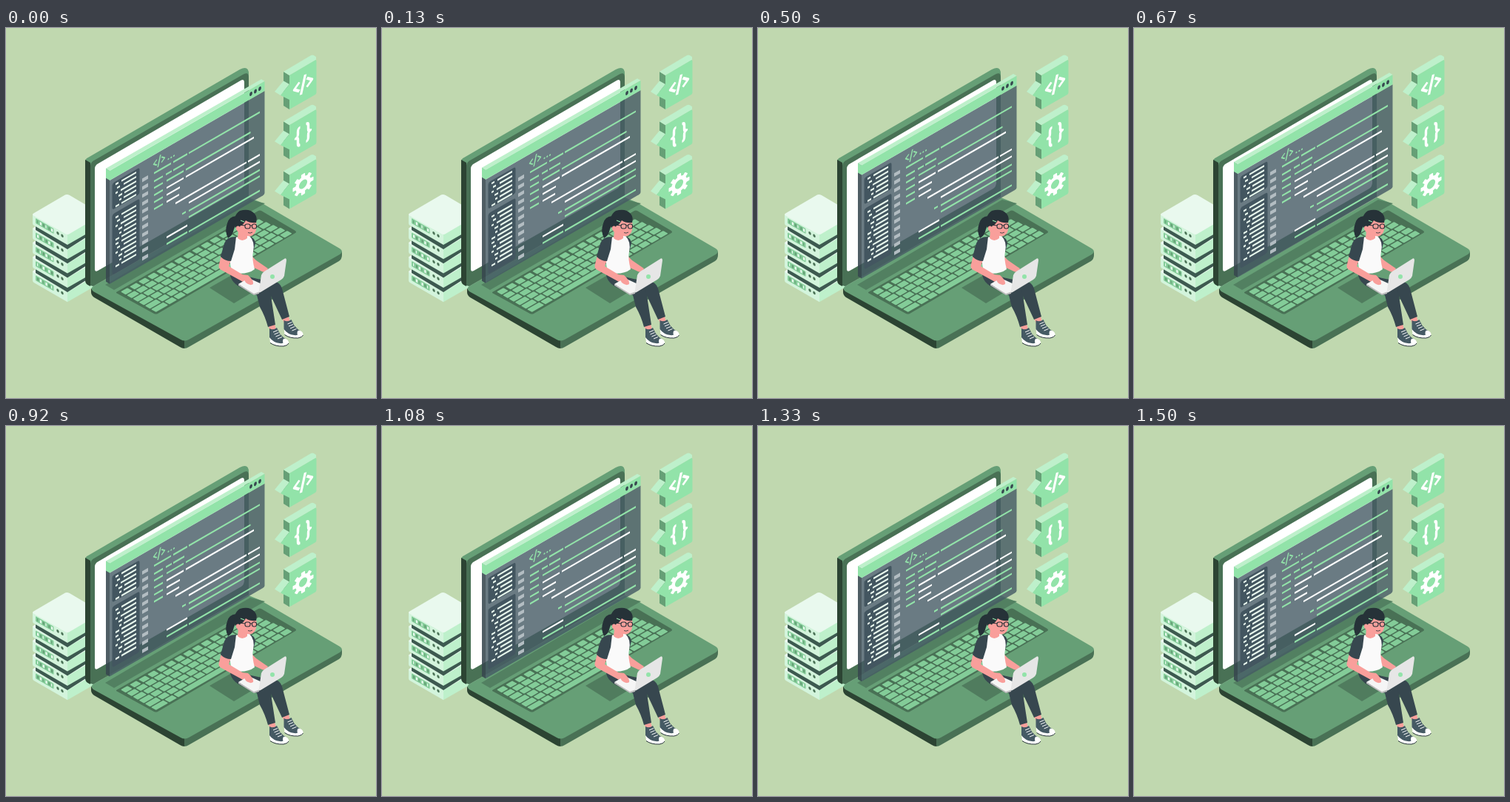
Write an HTML page that moves like this. It is 500 px wide and 500 px high and loops after 1.54 s.

```html
<!DOCTYPE html>
<html lang="en">
<head>
<meta charset="utf-8">
<title>Isometric coding scene</title>
<style>
html, body { margin: 0; width: 100%; height: 100%; overflow: hidden; background: #c0d8af; }
svg { display: block; width: 100vw; height: 100vh; }
</style>
</head>
<body>
<svg viewBox="0 0 500 500">
  <g id="servers"></g>

  <g id="base">
    <path fill="#2c4433" d="M115 352L241 421V433Q238 433 235 431L119 364Q115 361 115 357Z"/>
    <path fill="#497155" d="M241 421L454 302V307Q454 312 450 315L247 431Q244 433 241 433Z"/>
    <path fill="#669f76" d="M118 356Q113 352 118 349L328 229L343 235L451 298Q457 302 451 306L247 421Q241 424 236 421Z"/>
    <path fill="#528061" d="M134 347L330 232L350 237L146 354Z"/>
    <path fill="#497155" d="M149 357L341 247Q343 246 345 247L391 274Q393 276 391 277L205 386Q203 387 200 386L149 358Z"/>
    <path fill="#507c5e" d="M275 351L310 331L343 351L308 372Z"/>
    <g id="keys" fill="#83cc98" transform="matrix(1 -.577 1 .577 150 357)"></g>
  </g>

  <g id="lid">
    <path fill="#669f76" d="M107 180Q107 177 111 175L316 56Q328 50 328 62V80L114 190Z"/>
    <path fill="#2c4433" d="M107 178L114 182V349L112 348Q107 346 107 341Z"/>
    <path fill="#497155" d="M114 187Q114 182 118 179.500L320 63Q328 58 328 67V228L118 349L114 348Z"/>
    <path fill="#fff" d="M120 190Q120 186 124 183.500L317 71Q322 68 322 74V209Q322 214 318 217L124 328Q120 330 120 326Z"/>
  </g>

  <g id="panel">
    <path fill="#37474f" fill-opacity=".88" d="M135 190L140 193V346L135 343Z"/>
    <path fill="#92e3a9" d="M135 190L140 193V206L135 203Z"/>
    <path fill="#bef0cb" d="M135 190L345 69.500L349.500 72L140 193Z"/>
    <g id="code" transform="matrix(1 -.577 0 1 0 80.800)">
      <path fill="#455a64" fill-opacity=".8" d="M140 206H349.500V344Q349.500 346 347 346H140Z"/>
      <path fill="#92e3a9" d="M140 193H349.500V206H140Z"/>
      <rect x="143.500" y="212" width="37" height="36" rx="3" fill="#435660"/>
      <rect x="143.500" y="254" width="37" height="82" rx="3" fill="#435660"/>
    </g>
  </g>

  <g id="bubbles"></g>

  <g id="woman">
    <path fill="#263238" d="M311 254Q301 255 299 264Q295 274 300 284Q306 281 308 272Q312 264 311 254Z"/>
    <!-- far leg and shoe -->
    <path fill="#f99f9b" d="M372 390L381 387L384 397L376 399Z"/>
    <path fill="#37474f" d="M318 333Q338 340 361 342Q370 343 373 352L383 390L373 394L358 362L320 350Z"/>
    <g id="shoe" transform="translate(19.500 -11)">
      <path fill="#fff" d="M356 416L357 425Q364 431 375 430Q382 429 382 425Q381 421 377 420Z"/>
      <path fill="#455a64" d="M356 406Q361 409 366 405L370 413Q374 418 379 421Q377 427 370 426Q361 425 356 418Z"/>
      <path fill="#fff" d="M375 420Q379 419 382 424Q380 428 375 427Q373 423 375 420Z"/>
      <path fill="none" stroke="#263238" d="M357 425.500Q364 430.500 375 430Q381 429 382 426"/>
      <path fill="none" stroke="#fff" d="M361 411L367 408.500M362.500 414L368.500 411.500M364.500 417L370.500 414.500M367 420L373 417.500"/>
    </g>
    <!-- near leg -->
    <path fill="#f99f9b" d="M354 401L363 400L365 407Q360 410 356 407Z"/>
    <path fill="#37474f" d="M303 330Q318 332 333 341L350 348Q356 352 358 362L364 401L354 404Q350 389 343 377L339 361L316 350Q302 342 303 330Z"/>
    <use href="#shoe" transform="translate(-19.500 11)"/>
    <!-- arms and shirt -->
    <path fill="#f99f9b" d="M333 309L338 314L354 325Q351 331 346 329L331 322Z"/>
    <path fill="#37474f" d="M328 281Q336 283 337 291L335 299L330 300Z"/>
    <path fill="#fafafa" d="M307 285Q317 279 329 281Q337 289 334 302Q332 311 336 326Q326 334 306 331Q301 317 303 303Z"/>
    <path fill="#f99f9b" d="M314 275L326 278V284Q319 290 313 284Z"/>
    <path fill="#f99f9b" d="M291 307L304 313L301 322L321 334Q331 336 334 346Q329 349 322 344L291 327Q286 324 288 319Z"/>
    <path fill="#37474f" d="M311 282Q298 282 295 291L290 309Q296 315 304 315L309 299Z"/>
    <!-- head -->
    <path fill="#f99f9b" d="M313 257Q323 250 337 258Q340 267 337 276Q333 283 326 281Q316 281 311 272Z"/>
    <path fill="#263238" d="M310 269Q306 253 316 247Q329 243 336 251Q340 256 338 263Q330 264 324 260Q321 266 317 267L314 272Z"/>
    <circle cx="313.500" cy="270" r="2.600" fill="#f99f9b"/>
    <path stroke="#92e3a9" stroke-width="1.300" d="M317 260L322 262"/>
    <g fill="none" stroke="#263238" stroke-width="1.100">
      <rect x="323" y="265" width="7" height="6" rx="2.500"/>
      <rect x="332.500" y="265" width="6" height="6" rx="2.500"/>
      <path d="M315 266L323 267M330 267H332.500"/>
      <path stroke-width=".8" d="M327 276.500Q330 278 333 276"/>
    </g>
    <!-- small computer -->
    <path fill="#f5f5f5" d="M314 346L328 338L350 348L342 358L335 360Z"/>
    <path fill="#bdbdbd" d="M314 346L335 359L342 356.500V359L335 361L314 348Z"/>
    <path fill="#f99f9b" d="M318 333L327 334Q335 341 334 346Q330 349 324 344Z"/>
    <path fill="#e6e6e6" d="M345 334Q346 331 349 329L376 312Q379 310 379 314L376 335Q375 338 372 340L344 357Q341 358 342 354Z"/>
    <circle cx="360" cy="336" r="3" fill="#92e3a9"/>
  </g>
</svg>
<script>
const NS = 'http://www.w3.org/2000/svg';
const $ = id => document.getElementById(id);

function add(parent, tag, attrs) {
  const el = document.createElementNS(NS, tag);
  for (const k in attrs) el.setAttribute(k, attrs[k]);
  parent.appendChild(el);
  return el;
}
const shape = (g, d, fill) => add(g, 'path', { d, fill });
const stroke = (g, d, color, width) =>
  add(g, 'path', { d, fill: 'none', stroke: color, 'stroke-width': width, 'stroke-linejoin': 'round' });

const MINT = '#92e3a9', PALE = '#bef0cb', MIST = '#d3f4dc', SNOW = '#e9f9ee', LEAF = '#669f76';
const CHEVRONS = 'M-5 -6L-12 0L-5 6M3 -12L-3 12M5 -6L12 0L5 6';
const BRACES = 'M-4 -12Q-7 -12 -7 -8V-4Q-7 0 -10 0Q-7 0 -7 4V8Q-7 12 -4 12' +
               'M4 -12Q7 -12 7 -8V-4Q7 0 10 0Q7 0 7 4V8Q7 12 4 12';

// Server stack, bottom unit first
for (let i = 4; i >= 0; i--) {
  const g = add($('servers'), 'g', { transform: `translate(0 ${i * 19.3})` });
  if (i < 4) shape(g, 'M40 264L83 288L122 266V274L83 299L40 273Z', '#3d5a50');
  shape(g, 'M36 252L83 279V293L38 267Q36 266 36 264Z', MIST);
  shape(g, 'M83 279L130 252V266L83 293Z', PALE);
  shape(g, 'M38 254Q34 252 38 250L79 226Q82 224 86 226L130 252L86 278Q83 280 80 278Z', SNOW);
  const f = add(g, 'g', { transform: 'matrix(1 .577 0 1 40 257)' });
  add(f, 'rect', { width: 24.5, height: 7, rx: 1, fill: '#83cc98' });
  for (let k = 0; k < 6; k++)
    add(f, 'rect', { x: 2 + k * 3.8, y: 1.5, width: (k + i) % 3 ? 2.3 : 1.2, height: 4, fill: (k + i) % 2 ? SNOW : LEAF });
  for (const x of [30, 36]) add(f, 'ellipse', { cx: x, cy: 3, rx: 1.7, ry: 2, fill: '#497155' });
}

// Keyboard
for (let r = 0; r < 6; r++) {
  const gap = r ? 1.7 : 3;
  let u = 3, k = 0;
  while (u < 182) {
    let w = k ? 12 - gap : 9 + r * 1.5;
    if (r === 5 && k === 3) w = 58;
    w = Math.min(w, 187 - u);
    add($('keys'), 'rect', { x: u, y: 2 + r * 8.2, width: w, height: 6.7, rx: 1 });
    u += w + gap;
    k++;
  }
}

// Window contents, in sheared coordinates
const code = $('code');
const line = (y, x1, x2, color = MINT, width = 2.4) =>
  add(code, 'path', { d: `M${x1} ${y}H${x2}`, stroke: color, 'stroke-width': width });

for (const x of [331, 337, 343])
  add(code, 'ellipse', { cx: x, cy: 199.3, rx: 1.9, ry: 2.7, fill: '#37474f' });

const rows = [[148, 152, 156], [150, 154, 159], [148, 151, 155], [152, 157, 160], [153, 156, 159], [148, 153, 156]];
function list(top, n) {
  for (let i = 0; i < n; i++) {
    const [a, b, c] = rows[i % rows.length], y = top + i * 6;
    line(y, a, b, SNOW);
    line(y, c, 176, SNOW);
  }
}
list(216, 6);
list(261, 12);
for (let i = 0; i < 11; i++) line(231.5 + i * 10.6, 184, 192, '#b3bdc2', 4.8);

const tag = add(code, 'g', { transform: 'translate(207 218.5) scale(.62)' });
stroke(tag, CHEVRONS, MINT, 2.6);
for (const x of [219.5, 223.3, 227]) add(code, 'circle', { cx: x, cy: 223, r: 1.1, fill: MINT });

const W = '#fff';
[
  [231, 200, 223], [231, 226, 245], [231, 247, 343],
  [242, 200, 212], [242, 216, 224], [242, 226, 241],
  [251, 200, 212], [251, 217, 240], [251, 243, 330.5],
  [260.7, 200, 212], [260.7, 217, 240, W], [260.7, 243, 335, W],
  [270.2, 200, 212], [270.2, 217, 235, W],
  [279.5, 200, 212], [279.5, 217, 234, W],
  [288.5, 229, 325, W], [288.5, 327, 343, W],
  [298, 247, 343, W],
  [308, 238, 243], [309, 247, 343],
  [317.5, 247, 343], [337, 247, 343],
  [327.5, 217, 245, W], [336.5, 217, 245]
].forEach(a => line(...a));

// Floating blocks
function bubble(y) {
  const g = add($('bubbles'), 'g', { transform: `translate(0 ${y})` });
  shape(g, 'M375 59L383 64V110L375 105Z', LEAF);
  shape(g, 'M375 59L412 37Q414 36 416 37L419 39V43L383 64Z', PALE);
  shape(g, 'M383 64L417 44Q419.500 42 419.500 45V87Q419.500 89 418 90L383 110Z', MINT);
  shape(g, 'M363 86L375 71.500L383 76L371 91Z', PALE);
  shape(g, 'M371 91L383 76V97Z', MINT);
  return add(g, 'g', { transform: 'matrix(1 -.577 0 1 401.500 76.500)' });
}
stroke(bubble(0), CHEVRONS, '#fff', 3.5);
stroke(bubble(67.3), BRACES, '#fff', 3.4);
const gear = bubble(134.6);
add(gear, 'circle', { r: 8, fill: 'none', stroke: '#fff', 'stroke-width': 4.8 });
for (let i = 0; i < 8; i++)
  add(gear, 'rect', { x: -2.6, y: -14, width: 5.2, height: 5, rx: .8, fill: '#fff', transform: `rotate(${i * 45})` });

// The window bobs up and down at 24 steps per second
const LOOP = 1540, STEP = 1000 / 24, PEAK = 708, LIFT = 9;
function draw() {
  const now = performance.now() % LOOP;
  const t = Math.floor((now + 5) / STEP) * STEP;
  const y = -LIFT * (1 + Math.cos((t - PEAK) / LOOP * 2 * Math.PI)) / 2;
  $('panel').setAttribute('transform', `translate(0 ${y.toFixed(2)})`);
  requestAnimationFrame(draw);
}
draw();
</script>
</body>
</html>
```
